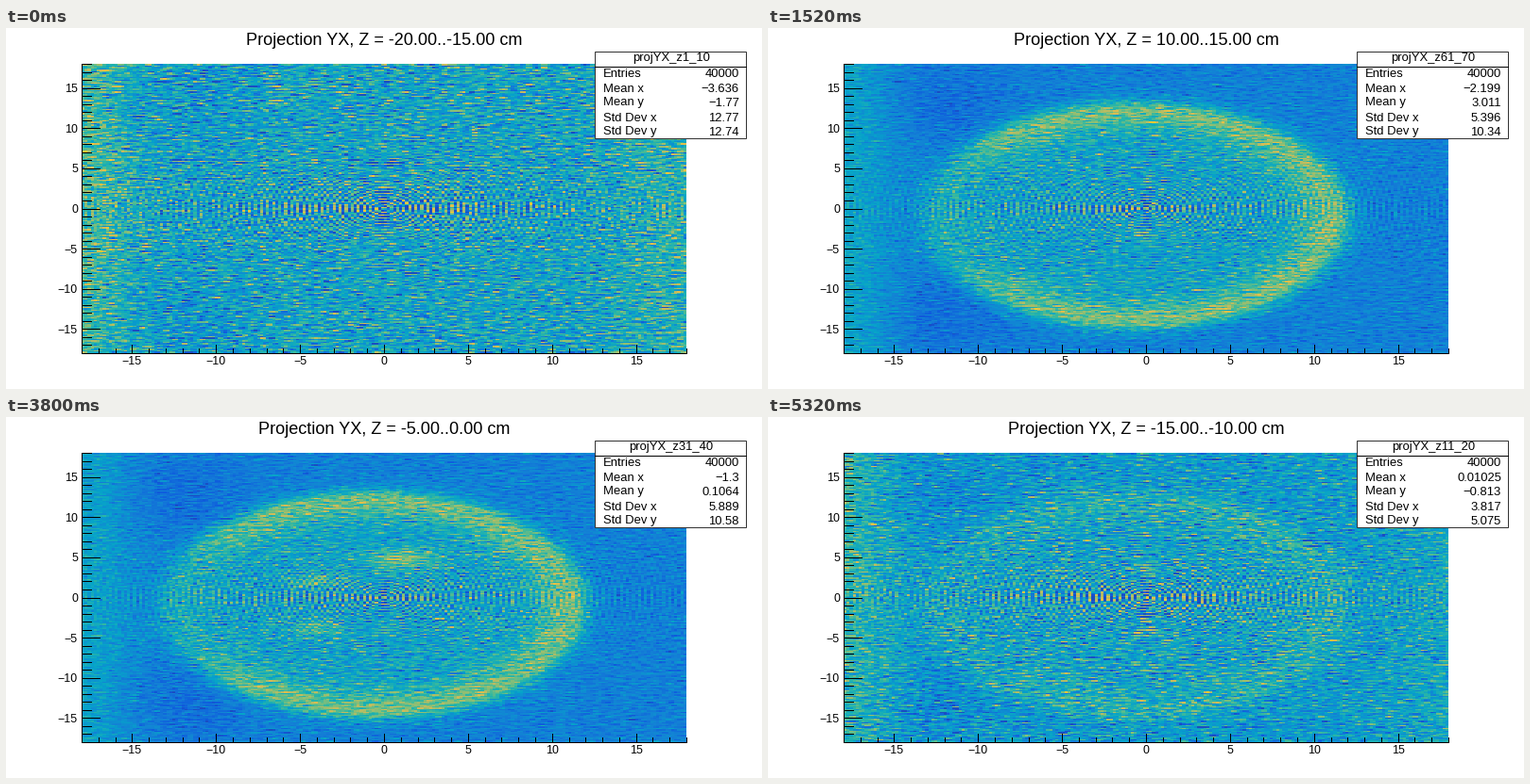
These frames come from a looping animation (800x383 px, 6080 ms). A matplotlib script:

```python
import numpy as np
import matplotlib.pyplot as plt
from matplotlib.animation import FuncAnimation
from matplotlib.colors import LinearSegmentedColormap
from matplotlib.patches import Rectangle

W, H, DPI = 800, 383, 100
PT = 72 / DPI
LEFT, RIGHT, TOP, BOTTOM = 80, 720, 38.3, 344.7
BINS, LIM = 200, 18
CELL = 2 * LIM / BINS
SLICES, STEP_MS = 8, 760
ANGLES = 90

plt.rcParams["font.family"] = "Liberation Sans"

bird = LinearSegmentedColormap.from_list("bird", list(zip(
    [0.2082, 0.0592, 0.0780, 0.0232, 0.1802, 0.5301, 0.8186, 0.9956, 0.9764],
    [0.1664, 0.3599, 0.5041, 0.6419, 0.7178, 0.7492, 0.7328, 0.7862, 0.9832],
    [0.5293, 0.8684, 0.8385, 0.7914, 0.6425, 0.4662, 0.3499, 0.1968, 0.0539])), N=255)

# Readouts per slice: mean x, mean y, std dev x, std dev y
STATS = """
−3.636 −1.77 12.77 12.74
0.3126 −3.195 10.33 11.74
−2.199 3.011 5.396 10.34
−1.495 0.2262 6.332 11.39
−1.412 0.1583 6.108 10.97
−1.3 0.1064 5.889 10.58
−1.084 −0.2145 5.317 9.462
0.01025 −0.813 3.817 5.075
""".strip().splitlines()

mid = (np.arange(BINS) + 0.5) * CELL - LIM
X, Y = np.meshgrid(mid, mid[::-1])


def blob(x, y, rx, ry):
    return np.exp(-((X - x) / rx) ** 2 - ((Y - y) / ry) ** 2)


# Skull section: an ellipse with a soft wall that fades on the left
U = np.hypot((X + 0.6) / 12.9, (Y + 0.9) / 14.4)
from_left = np.pi - np.abs(np.arctan2(Y + 0.9, X + 0.6))
INSIDE = 1 / (1 + np.exp((U - 1) / 0.04))
WALL = np.exp(-((U - 0.92) / np.where(U < 0.92, 0.16, 0.07)) ** 2)
WALL *= 1 - 0.75 * np.exp(-(from_left / 0.75) ** 4)

SPOTS = 0.24 * blob(1.2, 4.8, 2, 1.2) + 0.15 * (
    blob(-4, 2.1, 1.6, 0.9) + blob(-3.9, -3.8, 1.5, 0.8))
POCKETS = blob(-12, 13, 4, 5) + blob(-12, -13, 4, 5)
RINGS = np.sin(np.pi * np.hypot(X, Y) / CELL) * np.exp(-np.hypot(X / 8, Y / 3.5))

AXIS_BAND = np.exp(-(Y / 2) ** 2)
SHIFT = [np.floor((X * np.cos(t) + Y * np.sin(t)) / CELL).astype(int) + BINS
         for t in np.arange(ANGLES) * np.pi / ANGLES]


def grain(seed):
    """Back-projected detector noise, smeared sideways away from the x axis."""
    rng = np.random.default_rng(seed)
    total = np.zeros((BINS, BINS))
    for s in SHIFT:
        e = rng.standard_normal(2 * BINS)
        total += (e - 0.5 * (np.roll(e, 1) + np.roll(e, -1)))[s]
    smear = 2 * total + np.roll(total, 1, axis=1) + np.roll(total, -1, axis=1)
    return AXIS_BAND * total / total.std() + (1 - AXIS_BAND) * smear / smear.std()


def first_bin(i):
    return (1 - 10 * i) % 80


def slice_start(i):
    return -20 + (first_bin(i) - 1) / 2


def projection(i):
    z = slice_start(i) + 2.5
    skull = np.clip((z + 15) / 8, 0, 1) if z < 15 else 0
    empty = 1 - skull
    v = 0.25 + 0.14 * empty + skull * (0.13 * INSIDE + 0.23 * WALL)
    v = v + 0.14 * blob(-18, 0, 3, 60) - 0.06 * POCKETS
    v = v + 0.08 * empty * blob(18, 0, 4, 60)
    v = v + SPOTS * np.exp(-((z + 2.5) / 2.5) ** 2)
    outer, inner = 0.05 + 0.08 * empty, 0.095 + 0.035 * empty
    v = v + grain(40 + i) * (outer + (inner - outer) * INSIDE)
    v = v + (0.3 + 0.1 * empty) * RINGS
    return np.clip(v, 0.09, 0.88)


def label(x, y, s, size, ha="center"):
    """Text whose capitals are centred on y; sizes in pixels."""
    return ax.text(x, y + 0.36 * size, s, fontsize=size * PT, ha=ha,
                   va="baseline", color="black", zorder=5)


def line(x, y):
    ax.plot(x, y, color="black", lw=PT, antialiased=False, zorder=4,
            solid_capstyle="butt")


def signed(n):
    return str(n).replace("-", "−")


fig = plt.figure(figsize=(W / 100, H / 100), dpi=DPI, facecolor="white")
ax = fig.add_axes([0, 0, 1, 1])
ax.axis("off")

maps = [projection(i) for i in range(SLICES)]
image = ax.imshow(maps[0], cmap=bird, vmin=0, vmax=1, interpolation="nearest",
                  extent=(LEFT, RIGHT, BOTTOM, TOP), aspect="auto", zorder=1)

line([LEFT, LEFT], [TOP, BOTTOM])
line([LEFT, RIGHT], [BOTTOM, BOTTOM])
for n in range(-LIM, LIM + 1):
    px = LEFT + (n + LIM) / (2 * LIM) * (RIGHT - LEFT)
    py = BOTTOM - (n + LIM) / (2 * LIM) * (BOTTOM - TOP)
    major = n % 5 == 0
    line([px, px], [BOTTOM, BOTTOM - (9.2 if major else 4.6)])
    line([LEFT, LEFT + (19.2 if major else 9.6)], [py, py])
    if major:
        label(px, 352.5, signed(n), 12.4)
        label(76, py, signed(n), 12.4, "right")

ax.add_patch(Rectangle((623.4, 24.6), 160, 92, facecolor="white",
                       edgecolor="0.2", lw=PT, zorder=4))
line([623.4, 783.4], [40.6, 40.6])
title = label(400.5, 11.7, "", 18.1)
header = label(704, 30.7, "", 13)
values = []
for row, name in enumerate(["Entries", "Mean x", "Mean y", "Std Dev x", "Std Dev y"]):
    y = 47.8 + 15.4 * row
    label(632, y - 1.4 * name.endswith("y"), name, 13, "left")
    values.append(label(776, y, "", 13, "right"))

ax.set_xlim(0, W)
ax.set_ylim(H, 0)


def draw(i):
    first, z = first_bin(i), slice_start(i)
    image.set_data(maps[i])
    title.set_text(f"Projection YX, Z = {z:.2f}..{z + 5:.2f} cm")
    header.set_text(f"projYX_z{first}_{first + 9}")
    for t, s in zip(values, ["40000"] + STATS[i].split()):
        t.set_text(s)
    return [image, title, header, *values]


anim = FuncAnimation(fig, draw, frames=SLICES, interval=STEP_MS,
                     repeat=True, repeat_delay=0, blit=False)
plt.show()
```
